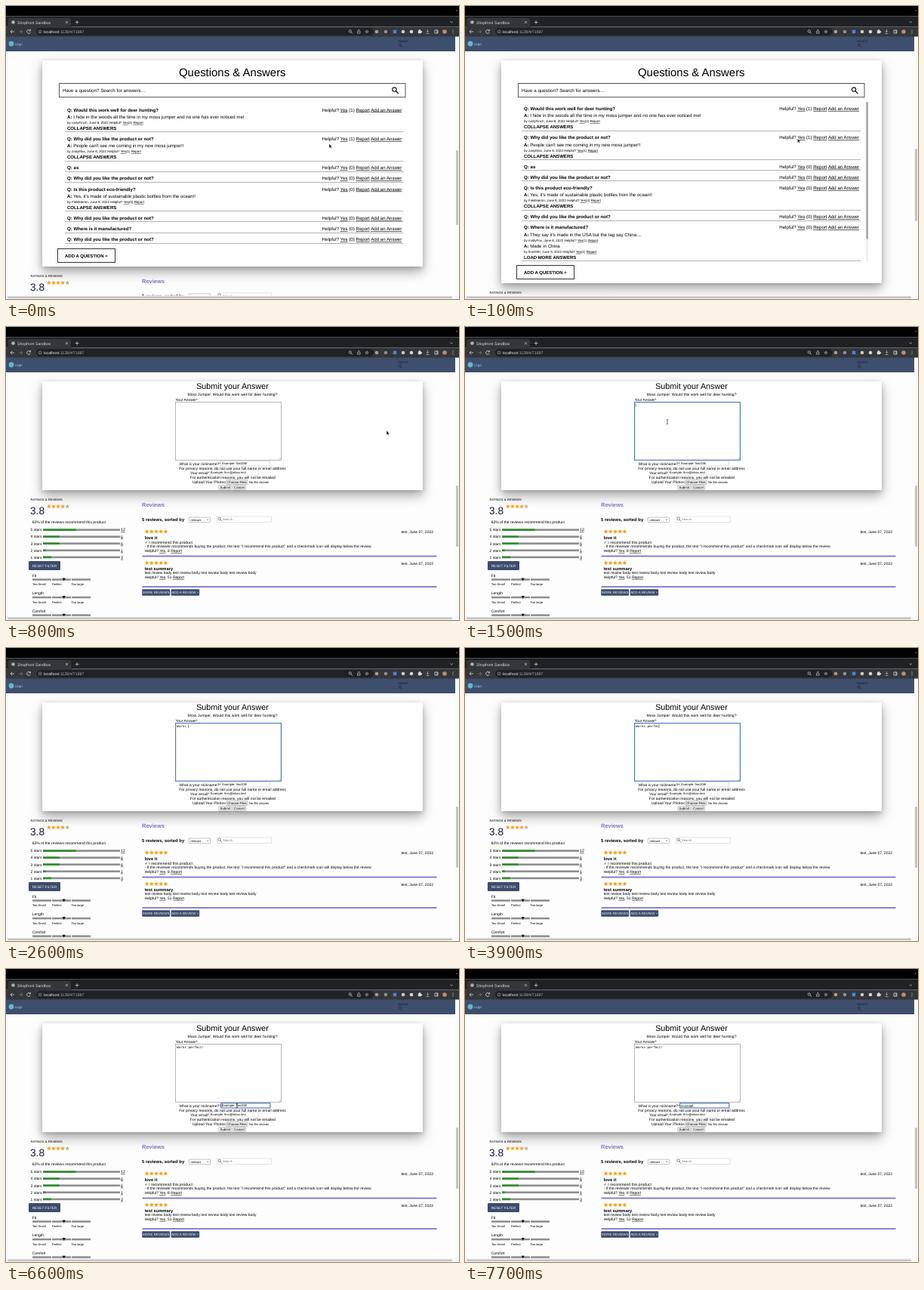
An HTML page for the animation above (8000 ms loop, 600x388 px).

```html
<!DOCTYPE html>
<html lang="en">
<head>
<meta charset="utf-8">
<title>Questions and answers</title>
<style>
html, body { margin: 0; width: 100%; height: 100%; overflow: hidden; background: #fff; }
svg { display: block; width: 100%; height: 100%; }
text { font-family: "Liberation Sans", Arial, sans-serif; fill: #000; text-rendering: geometricPrecision; white-space: pre; }
.b { font-weight: 700; }
.u { text-decoration: underline; }
.mono { font-family: "Liberation Mono", monospace; }
#panel { fill: #fefefe; filter: drop-shadow(0 7px 8px rgba(0,0,0,.28)) drop-shadow(0 2px 3px rgba(0,0,0,.2)); }
</style>
</head>
<body>
<svg id="stage" viewBox="0 0 600 388"></svg>
<script>
const LOOP = 8000, STEP = 100;
const NAVY = '#3d4c6c', PURPLE = '#8074c8', ORANGE = '#f5a31f', GREY = '#8e8e8e';

// ^bold^ and _underlined_ runs
const rich = s => s.replace(/\^(.+?)\^/g, '<tspan class="b">$1</tspan>')
                   .replace(/_(.+?)_/g, '<tspan class="u">$1</tspan>');
// y is the middle of the capitals
const text = (x, y, size, s, more = '') =>
  `<text x="${x}" y="${(y + size * .36).toFixed(2)}" font-size="${size}" ${more}>${rich(s)}</text>`;
const bold = (x, y, size, s, more = '') => text(x, y, size, s, 'class="b" ' + more);
const mid = (x, y, size, s, more = '') => text(x, y, size, s, 'text-anchor="middle" ' + more);
const rect = (x, y, w, h, fill, more = '') =>
  `<rect x="${x}" y="${y}" width="${w}" height="${h}" fill="${fill}" ${more}/>`;
const frame = (x, y, w, h, color, width, more = '') =>
  rect(x, y, w, h, '#fff', `stroke="${color}" stroke-width="${width}" ${more}`);
const path = (d, stroke, width = .8, fill = 'none') =>
  `<path d="${d}" fill="${fill}" stroke="${stroke}" stroke-width="${width}"/>`;
const dot = (x, y, r, fill) => `<circle cx="${x}" cy="${y}" r="${r}" fill="${fill}"/>`;
const lens = (x, y, r, color, width) =>
  path(`M${x + r * .7} ${y + r * .7}l${r * 1.3} ${r * 1.3}M${x + r} ${y}a${r} ${r} 0 1 0 ${-2 * r} 0a${r} ${r} 0 1 0 ${2 * r} 0`, color, width);

function star(x, y, r, fill) {
  const pts = Array.from({ length: 10 }, (_, i) => {
    const a = i * Math.PI / 5, k = i % 2 ? r * .45 : r;
    return `${(x + k * Math.sin(a)).toFixed(2)},${(y - k * Math.cos(a)).toFixed(2)}`;
  });
  return `<polygon points="${pts.join(' ')}" fill="${fill}"/>`;
}
const stars = (x, y, gap, full) =>
  [0, 1, 2, 3, 4].map(i => star(x + i * gap, y, 3.2, i < full ? ORANGE : '#b9b3a6')).join('');

function browser() {
  const light = '#d8d9db', dim = '#aeb2b7';
  const ext = [[491, '#b59a80'], [503, '#8d8f93'], [526, '#c9cacc'], [537, '#d5d5d8']];
  return rect(0, 0, 600, 13.5, '#000') + rect(0, 13.5, 600, 14, '#202124') +
    dot(597, 6, .8, '#d98a2b') +
    `<path d="M0 28q2.5 0 2.5-3v-6q0-3 3-3H83q3 0 3 3v6q0 3 3 3z" fill="#35363a"/>` +
    dot(9.5, 21.5, 2.3, dim) +
    text(15, 21.7, 5.2, 'Shopfront Sandbox', `style="fill:${light}"`) +
    path('M79 20l3 3m0-3l-3 3M91.6 21.5h5m-2.5-2.5v5M588.5 20.5l1.7 1.7 1.7-1.7', light, .7) +
    rect(0, 27.5, 600, 13, '#35363a') + rect(40, 29, 447, 10, '#202124', 'rx="5"') +
    path('M11 34H6m2.3-2.3L6 34l2.3 2.3', light) +
    path('M17 34h5m-2.3-2.3L22 34l-2.3 2.3', '#77797d') +
    path('M32 32.5a2.4 2.4 0 1 0 .3 2.3M32.4 31v2h-2', light) +
    path('M43 34a2 2 0 1 0 4 0a2 2 0 1 0-4 0M45 33.7v1.4', dim, .6) +
    text(49.5, 34, 5.25, `localhost<tspan style="fill:${dim}">:1128/#/71697</tspan>`, 'style="fill:#eee"') +
    lens(455.8, 33.4, 1.6, light, .7) +
    path('M465.5 33v3.2h3.6V33M467.3 35v-3.8m-1.2 1.2l1.2-1.2 1.2 1.2', light, .6) +
    star(478, 34, 2.6, light) + star(478, 34.1, 1.5, '#202124') +
    ext.map(([x, c]) => dot(x, 34, 2.3, c)).join('') + rect(512.8, 31.7, 4.5, 4.5, '#4b83e0') +
    rect(545.8, 32.3, 4.2, 4, light, 'rx=".6"') + dot(548, 32, 1, light) + dot(550.3, 34.3, 1, light) +
    path('M558.5 31.2v3.6m-1.6-1.6l1.6 1.6 1.6-1.6M556.5 36.5h4', light, .6) +
    path('M568 32h4v4h-4zM571 32v4', light, .8) + dot(581, 34, 2.8, '#b58f78') +
    [32, 34, 36].map(y => dot(592, y, .55, light)).join('');
}

const header = () => rect(0, 40, 595, 20, '#3e4e6d') + dot(7, 50, 3.4, '#62b7cb') +
  text(11.5, 50, 4.7, 'Logo', 'style="fill:#a6c4dc"') +
  text(519, 46.6, 4.4, 'Search', 'style="fill:#1c2233"') + lens(521.8, 51.6, 1.6, '#1c2233', .6);

const HUNT = 'Would this work well for deer hunting?', WHY = 'Why did you like the product or not?';
const QUESTIONS = [
  [HUNT, 1, [['I hide in the woods all the time in my moss jumper and no one has ever noticed me!', 'rustyFinch, June 8', 2]]],
  [WHY, 1, [["People can't see me coming in my new moss jumper!!", 'zanyMax, June 8', 1]]],
  ['as', 0, []],
  [WHY, 0, []],
  ['Is this product eco-friendly?', 0, [["Yes, it's made of sustainable plastic bottles from the ocean!!", 'FieldHeron, June 9', 0]]],
  [WHY, 0, []],
  ['Where is it manufactured?', 0, [["They say it's made in the USA but the tag say China....", 'mintyFox, June 8', 1],
    ['Made in China', 'finn208!, June 9', 1]]],
  [WHY, 0, []]
];

function list(x, right, y, full) {
  let out = '';
  QUESTIONS.slice(0, full ? 7 : 8).forEach(([q, votes, all], row) => {
    const answers = row === 6 && !full ? [] : all;
    out += bold(x, y, 6.12, 'Q: ' + q) +
      text(right, y, 6.12, `Helpful? _Yes_ (${votes}) _Report_ _Add an Answer_`, 'text-anchor="end"');
    answers.forEach(([a, by, n], i) => {
      out += text(x, y + 9.2 + 15 * i, 6.14, '^A:^ ' + a) +
        text(x, y + 17 + 15 * i, 4.47, `by ${by}, 2022 Helpful? _Yes_(${n}) _Report_`);
    });
    const extra = answers.length ? 9.3 + 15 * answers.length : 0;
    if (extra) out += bold(x, y + extra, 6.05, answers.length > 1 ? 'LOAD MORE ANSWERS' : 'COLLAPSE ANSWERS');
    y += 14.1 + extra;
    out += path(`M${x - 3} ${Math.floor(y - 8.9) + .5}H${right + 2}`, '#a0a0a0', .8);
  });
  return out;
}

const questions = (full, bottom) =>
  mid(299.8, 87.8, 14.9, 'Questions &amp; Answers') +
  frame(70.5, 102.5, 458.5, 18.2, '#555', 1) +
  text(75, 111.6, 6.22, 'Have a question? Search for answers…') +
  lens(full ? 515 : 514.4, 110.6, 2.7, '#111', 1.1) +
  (full ? list(78, 522, 135.7, true) + rect(531.2, 127, 2.8, 211, '#f0f0f0') +
          rect(531.2, 127, 2.8, 182, '#adadad', 'rx="1.4"')
        : list(81, 524.3, 137.3, false)) +
  frame(68.5, bottom - 23.5, 76, 18, '#333', 1) +
  bold(78, bottom - 14.6, 6, 'ADD A QUESTION +');

const button = (x, y, w, h, s) => rect(x, y, w, h, '#efefef', 'stroke="#888" stroke-width=".45" rx="1"') +
  mid(x + w / 2, y + h / 2, 4.4, s);

const modal = () =>
  mid(300, 78, 10.75, 'Submit your Answer') +
  mid(300, 89, 5.09, 'Moss Jumper: ' + HUNT) +
  text(224.5, 96.7, 4.9, 'Your Answer*') +
  frame(224.6, 99.6, 139.8, 76.6, '#888', .6, 'id="area"') +
  path('M361.5 175.5l2.3-2.3M363 175.5l.8-.8', '#777', .4) +
  `<text id="answer" class="mono" x="226" y="105.2" font-size="4.3"></text>` +
  text(229.5, 180.9, 4.95, 'What is your nickname?*') +
  frame(284.8, 177.6, 65, 6.4, '#aaa', .4, 'id="field"') +
  text(286.2, 181, 4.15, 'Example: finn208!', 'id="hint"') +
  `<text id="nick" x="286.2" y="182.5" font-size="4.3"></text>` +
  `<path id="caret" d="M0 0v4.4" stroke="#111" stroke-width=".5"/>` +
  mid(300, 187, 5.03, 'For privacy reasons, do not use your full name or email address') +
  text(244, 192.8, 4.95, 'Your email*') +
  frame(269.6, 189.8, 65.2, 6.2, '#bbb', .35) + text(270.8, 193, 4.15, 'Example: finn@inbox.test') +
  mid(300.3, 199.2, 5.03, 'For authentication reasons, you will not be emailed') +
  text(247, 205.4, 4.95, 'Upload Your Photos:') + button(292, 202.2, 28, 6.3, 'Choose Files') +
  text(322, 205.4, 4.15, 'No file chosen') +
  button(281.8, 209.6, 17, 6, 'Submit') + button(300.2, 209.6, 17.4, 6, 'Cancel');

const navyButton = (x, y, w, h, size, s) => rect(x, y, w, h, NAVY, 'rx="1.2"') +
  mid(x + w / 2, y + h / 2, size, s, 'style="fill:#f2f4fa"');

function slider(y, label) {
  return text(34.7, y, 5, label) +
    [35, 61, 87].map(x => rect(x, y + 4.2, 25, 2.5, GREY)).join('') +
    `<path d="M74.6 ${y + 3.5}h4.2l-2.1 3.9z" fill="#111"/>` +
    text(35, y + 12, 4, 'Too Small') + text(61, y + 12, 4, 'Perfect') + text(86.5, y + 12, 4, 'Too large');
}

function card(y, title, lines, end) {
  return stars(186.6, y, 6.2, 5) + text(566, y + .5, 5, 'test, June 07, 2022', 'text-anchor="end"') +
    bold(183.7, y + 7.7, 5.75, title) +
    lines.map((s, i) => text(183.7, y + (lines.length > 2 ? 14 : 13) + 5.6 * i, s[0] === '✓' ? 5.1 : 4.98, s)).join('') +
    rect(180.5, end - .9, 390, 1.8, PURPLE);
}

const reviews = () =>
  text(32.5, 228.2, 4.15, 'RATINGS &amp; REVIEWS') +
  text(32, 243.5, 13.7, '3.8', 'style="fill:#16183e"') + stars(56.8, 237.6, 6.1, 4) +
  text(34.7, 258, 5.01, '82% of the reviews recommend this product') +
  [12, 6, 6, 1, 3].map((n, i) => {
    const y = 268.6 + 9.07 * i;
    return text(32.5, y, 5, `${5 - i} stars`) + rect(49, y - 1.3, 102, 2.6, GREY) +
      rect(49, y - 1.3, n * 102 / 28, 2.6, '#2f8f2f') + text(152, y, 5.2, `_${n}_`);
  }).join('') +
  navyButton(30, 310, 42, 12, 4.7, 'RESET FILTER') +
  ['Fit', 'Length', 'Comfort'].map((s, i) => slider(329 + 23.6 * i, s)).join('') +
  bold(180, 235.7, 7.5, 'Reviews', `style="fill:${PURPLE}"`) +
  bold(180, 255, 5.88, '5 reviews, sorted by') +
  frame(242.3, 252, 28.2, 6.6, '#888', .5, 'rx="1"') + text(244.6, 255.3, 3.9, 'relevant') +
  path('M266 254.7l1.2 1.2 1.2-1.2', '#222', .6) +
  frame(279.5, 251, 72, 7.4, '#ccc', .5) + lens(282.8, 253.9, 1.8, '#444', .6) +
  text(287, 255, 4.1, 'Search', 'style="fill:#777"') +
  card(271, 'love it', ['✓ I recommend this product',
    '- If the reviewer recommends buying the product, the text "I recommend this product" and a checkmark icon will display below the review',
    'Helpful? _Yes_, 8 _Report_'], 303.5) +
  card(312.5, 'test summary', [Array(4).fill('test review body').join(' '), 'Helpful? _Yes_, 51 _Report_'], 344) +
  navyButton(180.2, 347.2, 37, 8.6, 4.5, 'MORE REVIEWS') + navyButton(218.6, 347.2, 37.6, 8.6, 4.5, 'ADD A REVIEW +');

const cursors = `<g id="cursor" stroke-linejoin="round">
  <path id="arrow" d="M0 0V5.5L1.3 4.4 2.2 6.3 3 5.9 2.2 4.1H3.9Z" fill="#000" stroke="#fff" stroke-width=".4"/>
  <path id="hand" d="M-.6 0q.6-.8 1.2 0v2l2.2.6q.6.2.4 1l-.5 2.6H-.4L-2 3.8q0-.8.8-.4l.6.5z" fill="#fff" stroke="#000" stroke-width=".5"/>
  <path id="beam" d="M-1.2-3q1.2 0 1.2.8q0-.8 1.2-.8M0-2.2V2.2M-1.2 3q1.2 0 1.2-.8q0 .8 1.2 .8" fill="none" stroke="#111" stroke-width=".6"/></g>`;

const stage = document.getElementById('stage');
stage.innerHTML = `<clipPath id="view"><rect y="40" width="600" height="343.6"/></clipPath>` +
  rect(0, 0, 600, 388, '#fdfdfd') +
  `<g clip-path="url(#view)"><rect id="panel" x="48" y="72" width="504" height="273"/>
   <g id="short">${questions(false, 345)}</g><g id="long">${questions(true, 367)}</g>
   <g id="modal">${modal()}</g><g id="reviews">${reviews()}</g></g>` +
  header() + rect(595, 40, 5, 348, '#fafafa') + rect(0, 383.6, 600, 4.4, '#f7f7f7') +
  rect(2, 384.6, 589, 2.4, '#c3c3c3', 'rx="1.2"') +
  rect(596.2, 191, 2.6, 99, '#bcbcbc', 'rx="1.3" id="thumb"') + browser() + cursors;

const $ = id => document.getElementById(id);
const show = (id, on) => $(id).setAttribute('display', on ? 'inline' : 'none');
const set = (id, attrs) => { for (const k in attrs) $(id).setAttribute(k, attrs[k]); };

const ANSWER = 'Works perfect!', NICK = 'finn208!';
const ANSWER_KEYS = [1800, 2100, 2300, 2400, 2500, 2600, 2800, 2900, 3100, 3400, 3600, 3900, 4200, 4600];
const NICK_KEYS = [6700, 6800, 6900, 7000, 7100, 7200, 7300, 7700];
const typed = (s, keys, t) => s.slice(0, keys.filter(k => k <= t).length);

// time, x, y
const MOUSE = [[0, 428, 182.5], [400, 507.5, 137], [700, 507.5, 137], [800, 504, 137.3], [1500, 268, 125.5],
  [4900, 268, 125.5], [5600, 299, 172], [5900, 303, 181], [6700, 306, 181]];
const smooth = k => k * k * (3 - 2 * k);

function mouseAt(t) {
  const i = MOUSE.findIndex(p => p[0] > t);
  if (i < 0) return MOUSE[MOUSE.length - 1].slice(1);
  const [t0, x0, y0] = MOUSE[i - 1], [t1, x1, y1] = MOUSE[i], k = smooth((t - t0) / (t1 - t0));
  return [x0 + (x1 - x0) * k, y0 + (y1 - y0) * k];
}

function draw(t) {
  const page = t < 100 ? 0 : t < 800 ? 1 : 2;
  const bottom = [345, 367, 216][page];
  ['short', 'long', 'modal'].forEach((id, i) => show(id, i === page));
  set('panel', { height: bottom - 72 });
  set('reviews', { transform: `translate(0 ${bottom - 216})` });
  set('thumb', { y: [191, 189, 210][page], height: [99, 96, 81][page] });

  const inArea = t >= 1500 && t < 5900, inNick = t >= 5900;
  set('area', { stroke: inArea ? '#4a72b8' : '#888', 'stroke-width': inArea ? 1.1 : .6 });
  set('field', { stroke: inNick ? '#4a72b8' : '#aaa', 'stroke-width': inNick ? 1.1 : .4 });
  $('answer').textContent = typed(ANSWER, ANSWER_KEYS, t);
  $('nick').textContent = typed(NICK, NICK_KEYS, t);
  show('hint', t < NICK_KEYS[0]);
  show('caret', inArea || inNick);
  if (inArea || inNick) {
    const el = $(inArea ? 'answer' : 'nick');
    const x = +el.getAttribute('x') + (el.textContent ? el.getComputedTextLength() : 0) + .2;
    set('caret', { transform: `translate(${x} ${inArea ? 101.4 : 178.6})` });
  }

  const [x, y] = mouseAt(t);
  const beam = page === 2 && x < 364 && y < 184, hand = t >= 400 && t < 800;
  show('cursor', t < 1800 || (t >= 5000 && t < 6700));
  show('beam', beam);
  show('hand', hand);
  show('arrow', !beam && !hand);
  set('cursor', { transform: `translate(${x} ${y})` });
}

const start = performance.now();
function tick() {
  const t = (performance.now() - start) % LOOP;
  draw(Math.floor(t / STEP) * STEP);
  requestAnimationFrame(tick);
}
tick();
</script>
</body>
</html>
```
